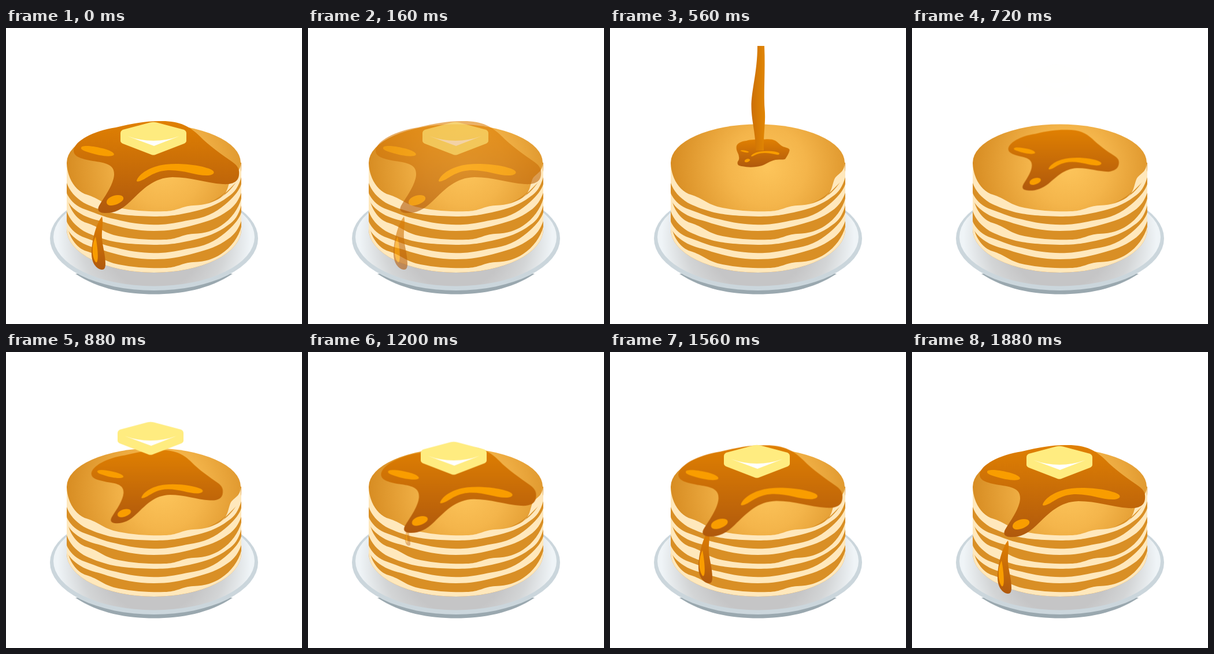
Recreate the animation shown at these times as an HTML page. Size 512 by 512 pixels, loop 1920 ms.

```html
<!DOCTYPE html>
<html lang="en">
<head>
<meta charset="utf-8">
<title>Pancakes</title>
<style>
html, body { margin: 0; width: 100%; height: 100%; overflow: hidden; background: #fff; }
svg { display: block; width: 100vw; height: 100vh; }

.anim { animation: 1920ms linear infinite; }
#syrup { animation-name: appear; transform-origin: 261px 212px; }
#spread { animation-name: spread; transform-origin: 266px 204px; }
#stream { animation-name: pour; }
#butter { animation-name: drop; }
#drip { animation-name: drip; transform-origin: 160px 372px; }
.morph { animation-name: morph; }

/* Each syrup shape flows from its small puddle outline to its full one. */
#pool {
  --small: path("M219,206 C219,200 226,196 236,195 C245,193 252,193 262,193 C274,192 280,192 286,195 C292,199 296,205 302,206 C308,208 311,209 310,212 C309,217 306,221 303,226 C299,229 294,226 286,228 C276,230 270,236 262,238 C252,241 238,241 230,239 C222,238 220,236 221,231 C223,228 224,226 223,222 C223,219 221,216 220,213 C219,210 219,208 219,206Z");
  --full: path("M117,212 C118,196 150,178 190,172 C220,165 240,161 265,161 C300,160 318,170 335,187 C350,203 375,220 392,232 C402,239 404,246 403,254 C402,267 390,271 375,270 C345,268 320,258 288,258 C255,259 238,278 215,300 C200,315 185,321 170,320 C158,319 157,313 163,304 C172,290 186,270 187,254 C188,236 172,233 150,230 C128,226 117,222 117,212Z");
}
#shineLeft {
  --small: path("M226,212 C227,211 231,211 235,212 C239,213 241,214 240,215 C238,216 233,215 230,214 C228,213 226,213 226,212Z");
  --full: path("M130,207 C131,202 150,204 166,208 C180,211 190,217 186,220 C180,224 158,220 146,216 C137,213 129,211 130,207Z");
}
#shineMid {
  --small: path("M244,221 C247,217 256,213 266,213 C278,212 286,213 290,215 C293,216 294,218 291,219 C284,219 278,216 268,216 C258,216 252,219 248,221 C246,222 244,222 244,221Z");
  --full: path("M226,264 C230,252 250,239 276,236 C305,233 340,238 355,245 C363,249 360,254 350,255 C330,256 310,246 284,246 C262,246 250,255 238,262 C232,265 226,267 226,264Z");
}
#shineLow {
  --small: path("M233,230 C233,228 236,226 239,226 C242,226 243,228 242,229 C240,231 238,232 236,232 C234,232 233,231 233,230Z");
  --full: path("M174,301 C174,295 184,289 194,289 C202,289 205,293 202,298 C198,303 188,307 182,307 C177,307 174,305 174,301Z");
}

@keyframes morph {
  0%, 20.9% { d: var(--full); }
  21%, 29.17% { d: var(--small); animation-timing-function: cubic-bezier(.3, .45, .67, .85); }
  45.83%, 100% { d: var(--full); }
}
@keyframes appear {
  0% { opacity: 1; transform: none; }
  20.83% { opacity: 0; transform: none; }
  20.9%, 24% { opacity: 0; transform: scale(.15); }
  24.1% { opacity: 1; transform: scale(.15); }
  29.17%, 100% { opacity: 1; transform: none; }
}
@keyframes spread {
  0%, 29.17% { transform: scale(1); }
  45.83% { transform: scale(.794); animation-timing-function: cubic-bezier(.3, .45, .67, .85); }
  62.5% { transform: scale(.937); animation-timing-function: cubic-bezier(.3, .55, .67, .95); }
  81.25% { transform: scale(.992); }
  97.92%, 100% { transform: scale(1); }
}
@keyframes pour {
  0%, 20.83% { transform: translateY(-185px); }
  27.08%, 29.17% { transform: translateY(0); }
  36.5%, 100% { transform: translateY(185px); }
}
@keyframes drop {
  0% { opacity: 1; transform: none; }
  20.83% { opacity: 0; transform: none; }
  20.9%, 37.5% { opacity: 0; transform: translate(-6px, -100px); }
  43.75% { opacity: 1; }
  45.83% { opacity: 1; transform: translate(-5px, -42px); animation-timing-function: cubic-bezier(.3, .5, .6, .95); }
  60.42% { transform: translate(-3.3px, -9px); }
  62.5% { transform: translate(-3px, -7.5px); animation-timing-function: cubic-bezier(.3, .45, .67, .85); }
  81.25% { transform: translate(-1px, -2px); }
  97.92%, 100% { opacity: 1; transform: none; }
}
@keyframes drip {
  0% { opacity: 1; transform: none; }
  20.83% { opacity: 0; transform: none; }
  20.9%, 60.42% { opacity: 0; transform: translate(13px, -62px) scale(.3); }
  62.5% { opacity: .4; transform: translate(12.5px, -54.5px) scale(.38); }
  67% { opacity: 1; }
  81.25% { transform: translate(5px, -18px) scale(1); }
  87.5% { transform: translate(2px, -7px) scale(1); }
  97.92%, 100% { opacity: 1; transform: none; }
}
</style>
</head>
<body>
<svg viewBox="0 0 512 512">
  <defs>
    <radialGradient id="plateFill" gradientUnits="userSpaceOnUse" cx="256" cy="364" r="174">
      <stop offset=".5" stop-color="#c5c5c6"/>
      <stop offset=".72" stop-color="#d3d5d6"/>
      <stop offset=".96" stop-color="#eff4f7"/>
    </radialGradient>
    <radialGradient id="faceFill" gradientUnits="userSpaceOnUse" cx="272" cy="240" r="168">
      <stop offset="0" stop-color="#fdc55b"/>
      <stop offset=".4" stop-color="#f4b54b"/>
      <stop offset="1" stop-color="#d78c22"/>
    </radialGradient>
    <linearGradient id="syrupFill" x1="0" y1="0" x2="0" y2="1">
      <stop offset="0" stop-color="#e08002"/>
      <stop offset="1" stop-color="#b0590d"/>
    </linearGradient>
    <linearGradient id="streamFill">
      <stop offset="0" stop-color="#cb6f06"/>
      <stop offset="1" stop-color="#e28704"/>
    </linearGradient>
    <clipPath id="stackClip">
      <path d="M105,233 V348 A151,75 0 0 0 407,348 V233Z"/>
    </clipPath>
    <clipPath id="streamClip"><rect x="230" y="30" width="60" height="182"/></clipPath>
    <path id="rimA" d="M105,234 C106,258 118,279 136,287 C158,293 166,303 186,309 C215,316 246,318 274,317 C296,317 304,308 324,307 C346,306 358,302 372,293 C390,281 402,264 407,246 V258 C402,275 396,284 384,292 C366,306 345,313 322,318 C300,323 285,326 256,326 C215,325 196,323 176,318 C155,312 146,308 134,302 C120,293 110,282 105,268Z"/>
    <path id="rimB" d="M105,286 C110,296 118,306 132,312 C150,318 168,327 190,331 C215,338 245,341 268,340 C290,339 305,334 325,331 C350,327 370,314 384,301 C396,290 404,280 407,270 V285 C402,298 396,308 384,316 C366,329 350,334 328,340 C300,348 280,351 256,351 C225,351 200,345 176,338 C160,332 148,331 134,324 C120,316 110,308 105,296Z"/>
  </defs>

  <path d="M120,425 C160,452 210,460.500 256,460.500 C302,460.500 352,452 392,425Z" fill="#9aa8af"/>
  <ellipse cx="256" cy="364" rx="180" ry="90" fill="#cbd6dc"/>
  <ellipse cx="256" cy="361.500" rx="174" ry="85" fill="url(#plateFill)"/>

  <g clip-path="url(#stackClip)">
    <rect x="100" y="230" width="312" height="200" fill="#d98f25"/>
    <g fill="#ffe8bc">
      <use href="#rimB"/>
      <use href="#rimA" y="49"/>
      <use href="#rimB" y="49"/>
      <use href="#rimA" y="98"/>
    </g>
  </g>
  <path d="M105,233 A150.500,66.500 0 0 1 406,233 A150.500,90 0 0 1 105,233Z" fill="url(#faceFill)"/>
  <g fill="#ffe8bc">
    <use href="#rimA"/>
    <path d="M370,295 C384,286 384,272 388,262 C392,252 405,252 406,234 L407,258Z"/>
  </g>

  <g id="drip" class="anim">
    <path d="M166,326 C169,335 165,350 166,364 C167,378 172,392 172,408 C172,415 170,418 166,418 C156,417 148,406 148,390 C148,368 156,338 166,326Z" fill="url(#syrupFill)"/>
    <path d="M155,361 C149,371 147,394 155,405 C161,409 159,381 155,361Z" fill="#f99d00"/>
  </g>

  <g id="syrup" class="anim">
    <g id="spread" class="anim">
      <path id="pool" class="anim morph" fill="url(#syrupFill)"/>
      <g fill="#f99d00">
        <path id="shineLeft" class="anim morph"/>
        <path id="shineMid" class="anim morph"/>
        <path id="shineLow" class="anim morph"/>
      </g>
    </g>
  </g>

  <g clip-path="url(#streamClip)">
    <path id="stream" class="anim" fill="url(#streamFill)" d="M255,30 C255,75 244,108 244.500,135 C245,162 252,180 252,212 H266 C265,185 269,165 268,145 C265,112 269,75 267,30Z"/>
  </g>

  <g id="butter" class="anim">
    <path d="M249,163.500 Q255,162 261,163.500 L308,176 Q312,178 312,182 V195 Q312,198 308,200 L260,218.500 Q255,221 250,218.500 L202,200 Q198,198 198,195 V182 Q198,178 202,176Z" fill="#ffec80"/>
    <path d="M210,187 Q255,203 300,187 L256,204Z" fill="#fff"/>
  </g>
</svg>
</body>
</html>
```
